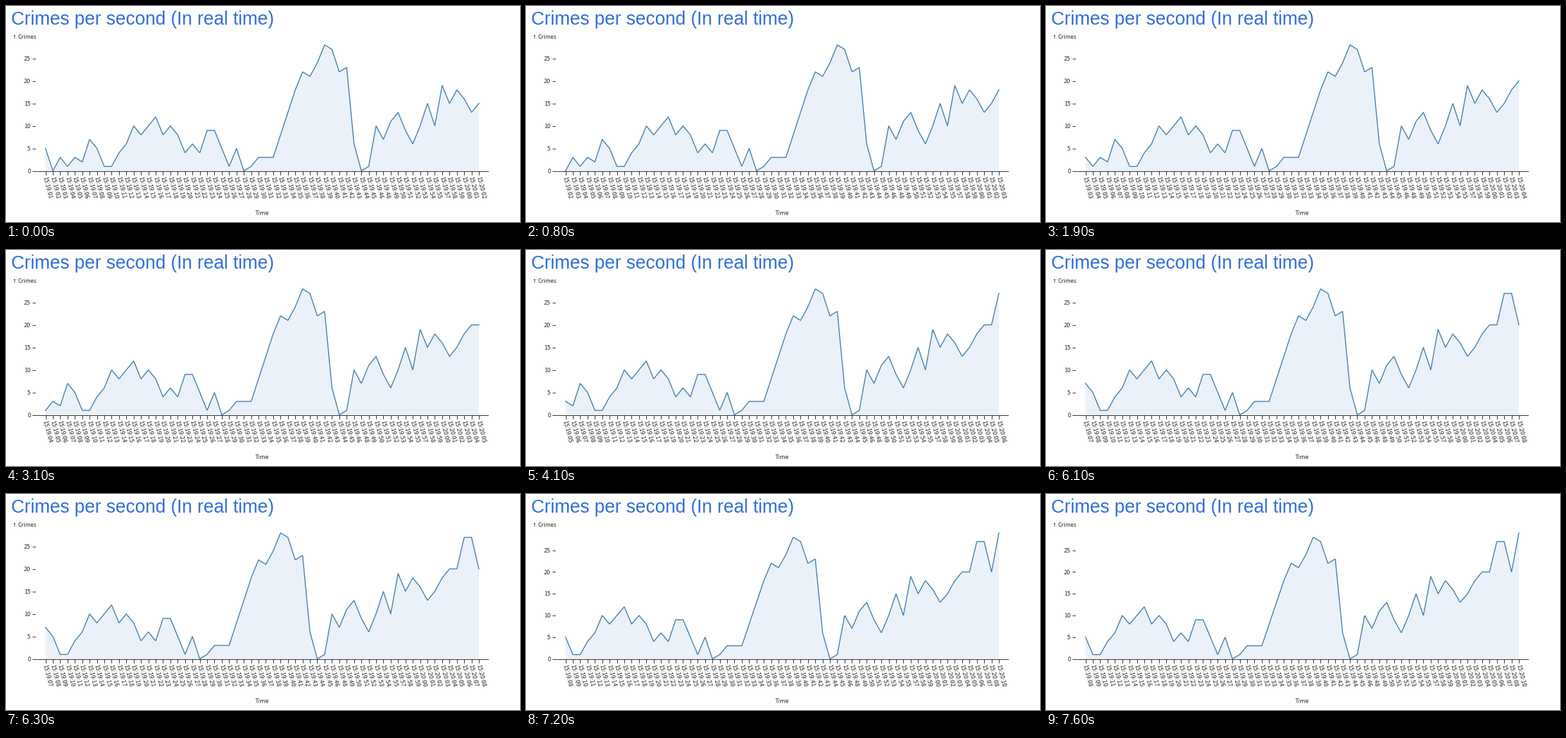
These frames come from a looping animation (800x336 px, 8 s). A matplotlib script:

```python
import matplotlib.pyplot as plt
from matplotlib.animation import FuncAnimation

WIDTH, HEIGHT, DPI = 800, 336, 100
PX = 72 / DPI  # points per pixel
FRAMES, INTERVAL = 80, 100

INK, LINE, FILL, TITLE = "#2a2a2a", "#4682b4", "#ebf1f8", "#2f6fdb"
SANS = "Noto Sans CJK JP"

WINDOW = 60
LEFT, RIGHT, TOP, BASE = 61.5, 736, 60.5, 256.5
SHIFT_TIMES = (800, 1900, 2900, 4000, 5100, 6000, 7200)

VALUES = [
    5, 0, 3, 1, 3, 2, 7, 5, 1, 1, 4, 6, 10, 8, 10, 12, 8, 10, 8, 4,
    6, 4, 9, 9, 5, 1, 5, 0, 1, 3, 3, 3, 8, 13, 18, 22, 21, 24, 28, 27,
    22, 23, 6, 0, 1, 10, 7, 11, 13, 9, 6, 10, 15, 10, 19, 15, 18, 16, 13, 15,
    18, 20, 20, 27, 27, 20, 29,
]
MISSED_SECONDS = (47, 56, 69)
STAMPS = [f"15:{19 + s // 60}:{s % 60:02d}"
          for s in range(1, 71) if s not in MISSED_SECONDS]

XS = [LEFT + i * (RIGHT - LEFT) / (WINDOW - 1) for i in range(WINDOW)]

fig = plt.figure(figsize=(WIDTH / DPI, HEIGHT / DPI), dpi=DPI, facecolor="white")
ax = fig.add_axes([0, 0, 1, 1])
ax.set_xlim(0, WIDTH)
ax.set_ylim(HEIGHT, 0)
ax.axis("off")


def label(x, y, text, size=9.2, color=INK, font=SANS, **kwargs):
    kwargs.setdefault("va", "baseline")
    return ax.text(x, y, text, fontsize=size * PX, color=color,
                   family=font, **kwargs)


def stroke(xs, ys, color=INK, width=1.0, **kwargs):
    return ax.plot(xs, ys, color=color, lw=width * PX, **kwargs)[0]


label(8, 29, "Crimes per second (In real time)", 28.6, TITLE, "Liberation Sans")
label(13, 51, "↑", 8, font="DejaVu Sans", ha="center")
label(18.5, 51.3, "Crimes", 9)
label(398.5, 325, "Time", ha="center")

area = ax.fill([0], [0], color=FILL, lw=0)[0]
curve = stroke([], [], LINE, 1.5, solid_joinstyle="miter")

stroke([41, 751], [BASE, BASE], solid_capstyle="butt")
for x in XS:
    stroke([x, x], [BASE, BASE + 6], solid_capstyle="butt")

time_labels = [label(x - 4, 265.5, "", ha="left", rotation=-76,
                     rotation_mode="anchor") for x in XS]
count_ticks = [(v, stroke([], [], solid_capstyle="butt"),
                label(38.3, 0, str(v), ha="right"))
               for v in range(0, 30, 5)]


def update(frame):
    start = sum(frame * INTERVAL >= t for t in SHIFT_TIMES)
    values = VALUES[start:start + WINDOW]
    scale = (BASE - TOP) / max(values)
    ys = [BASE - v * scale for v in values]

    curve.set_data(XS, ys)
    area.set_xy([(LEFT, BASE), *zip(XS, ys), (RIGHT, BASE)])
    for text, stamp in zip(time_labels, STAMPS[start:]):
        text.set_text(stamp)
    for value, tick, text in count_ticks:
        y = BASE - value * scale
        tick.set_data([41, 46], [y, y])
        text.set_y(y + 3.3)
    return [area, curve, *time_labels]


anim = FuncAnimation(fig, update, frames=FRAMES, interval=INTERVAL,
                     repeat=True, repeat_delay=0, blit=False)
plt.show()
```
